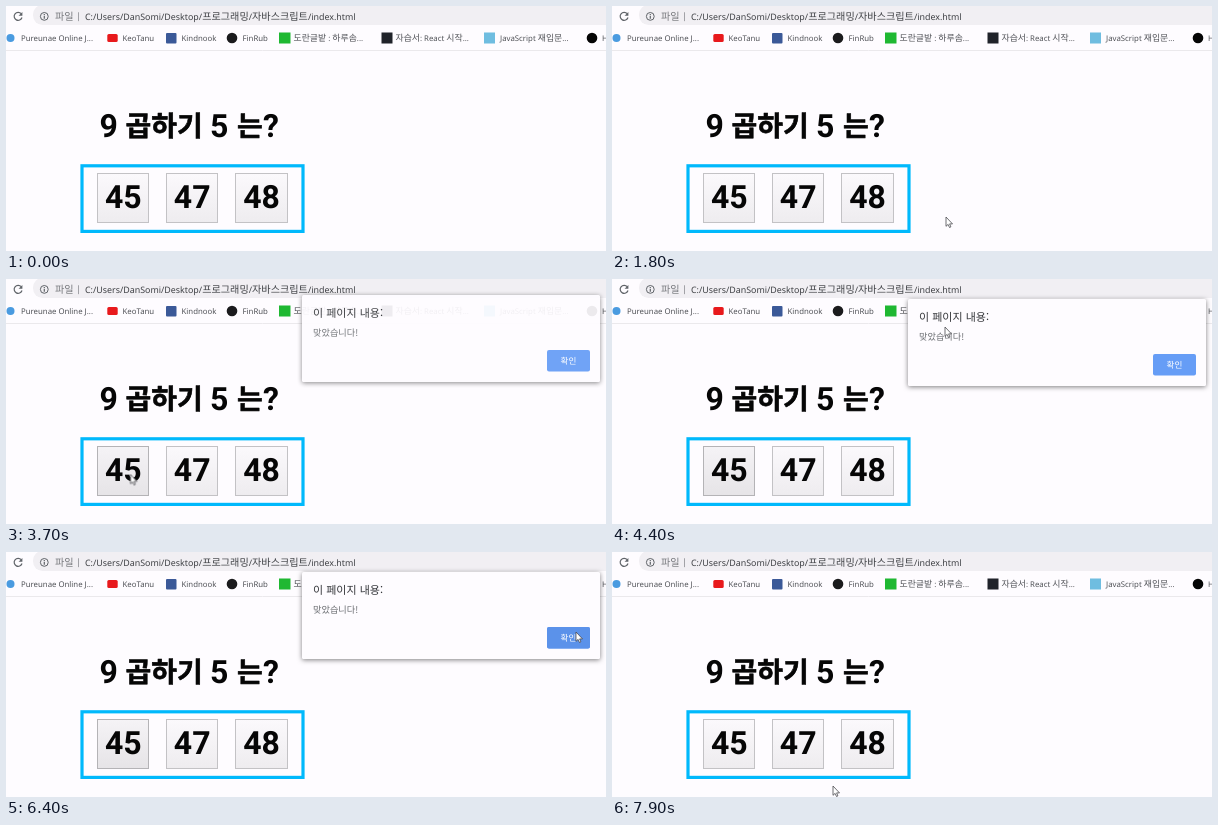
An HTML page that plays this animation: 600x245 px, repeating every 8000 ms.

```html
<!DOCTYPE html>
<html lang="ko">
<head>
<meta charset="utf-8">
<title>Quiz</title>
<style>
html, body { margin: 0; width: 100%; height: 100%; overflow: hidden; background: #fefcff; }
svg { display: block; width: 600px; height: 245px; }
text { font-family: "Noto Sans", "Noto Sans CJK KR", "Noto Sans CJK", sans-serif; white-space: pre; text-rendering: geometricPrecision; }
.ko { font-family: "Noto Sans CJK KR", "Noto Sans CJK", sans-serif; }
.url { font-size: 8.9px; fill: #3f4145; }
.url .ko { font-size: 10.15px; }
.url .soft { fill: #77797d; }
.marks { font-size: 7.8px; fill: #505257; }
.marks .ko { font-size: 8.9px; }
.big { font-weight: 700; fill: #060606; }
.big, .num { font-family: Roboto, "Noto Sans CJK KR", "Noto Sans CJK", sans-serif; font-size: 32px; }
.big .ko { font-size: 28px; stroke: #060606; stroke-width: .6; stroke-linejoin: round; }
.mid { text-anchor: middle; }
.btn { fill: url(#face); stroke: #c3c2c5; }

.hover, .ok-hover, .dialog, .cursor { animation: 8s -20ms infinite step-end; }
.hover { animation-name: hover; }
.ok-hover { animation-name: ok; }
.dialog { animation-name: dialog; filter: drop-shadow(0 1px 2.5px rgba(0, 0, 0, .5)); }
.cursor { animation-name: cursor; animation-timing-function: steps(2); }

@keyframes hover { 0%, 86.25%, 100% { opacity: 0; } 38.75% { opacity: 1; } }
@keyframes ok { 0%, 100% { opacity: 0; } 78.75% { opacity: 1; } }
@keyframes dialog {
  0%, 87.5%, 100% { opacity: 0; transform: translateY(-8px); }
  45% { opacity: .5; transform: translateY(-8px); }
  46.25% { opacity: .93; transform: translateY(-4px); }
  47.5% { opacity: 1; transform: none; }
  85% { opacity: .6; transform: none; }
  86.25% { opacity: .2; transform: none; }
}
/* Circles the quiz, clicks 45, circles the dialog, clicks OK, leaves */
@keyframes cursor {
  0%, 93.75%, 100% { transform: translate(-30px, -30px); animation-timing-function: step-end; }
  5% { transform: translate(240px, 224px); }
  7.5% { transform: translate(345px, 150px); }
  10% { transform: translate(215px, 62px); }
  12.5% { transform: translate(75px, 82px); }
  15% { transform: translate(34px, 150px); }
  17.5% { transform: translate(95px, 226px); }
  20% { transform: translate(235px, 231px); }
  22.5% { transform: translate(334px, 211px); }
  25% { transform: translate(357px, 165px); }
  27.5% { transform: translate(312px, 90px); }
  30% { transform: translate(165px, 68px); animation-timing-function: step-end; }
  31.25% { transform: translate(102px, 87px); }
  33.75% { transform: translate(7px, 165px); }
  36.25% { transform: translate(62px, 236px); animation-timing-function: step-end; }
  37.5% { transform: translate(104px, 221px); }
  40% { transform: translate(118px, 203px); }
  42.5%, 48.75% { transform: translate(124.5px, 195.5px); }
  51.25% { transform: translate(235px, 125px); }
  53.75% { transform: translate(316px, 72px); }
  56.25% { transform: translate(350px, 24px); }
  58.75% { transform: translate(470px, 8px); }
  61.25% { transform: translate(577px, 50px); }
  63.75% { transform: translate(470px, 101px); }
  66.25% { transform: translate(315px, 80px); animation-timing-function: step-end; }
  67.5% { transform: translate(332px, 73px); }
  70% { transform: translate(430px, 112px); }
  72.5% { transform: translate(545px, 119px); }
  75% { transform: translate(593px, 98px); }
  77.5% { transform: translate(576px, 83px); }
  80%, 86.25% { transform: translate(570px, 80px); }
  88.75% { transform: translate(520px, 120px); }
  91.25% { transform: translate(425px, 185px); animation-timing-function: step-end; }
  92.5% { transform: translate(375px, 206px); animation-timing-function: step-end; }
  96.25% { transform: translate(251px, 238px); }
  98.75% { transform: translate(221px, 234px); animation-timing-function: step-end; }
}
</style>
</head>
<body>
<svg viewBox="0 0 600 245">
  <defs>
    <linearGradient id="face" x2="0" y2="1"><stop stop-color="#fbf9fc"/><stop offset="1" stop-color="#eeecef"/></linearGradient>
    <linearGradient id="faceOn" x2="0" y2="1"><stop stop-color="#f5f3f6"/><stop offset="1" stop-color="#e6e4e7"/></linearGradient>
  </defs>
  <rect width="600" height="245" fill="#fefcff"/>

  <!-- address bar -->
  <path d="M0 44.5H600" stroke="#ebe9ec"/>
  <rect x="27" y="-1" width="620" height="20" rx="9.5" fill="#f1eff3"/>
  <g fill="none" stroke="#5f6368" stroke-width="1.2">
    <path d="M15.2 7.7A4 4 0 1 0 16 11.5"/>
    <circle cx="38.3" cy="10.4" r="3.9" stroke-width="1"/>
    <path d="M38.3 9.8V12.7M38.3 7.9V8.9"/>
  </g>
  <path d="M16.4 5.9V9.7H12.6Z" fill="#5f6368"/>
  <g class="url">
    <text x="49" y="13.8" class="soft"><tspan class="ko">파일</tspan></text>
    <text x="70" y="13.2" class="soft">|</text>
    <text x="79" y="13.8">C:/Users/DanSomi/Desktop/<tspan class="ko">프로그래밍</tspan>/<tspan class="ko">자바스크립트</tspan>/index.html</text>
  </g>

  <!-- bookmarks -->
  <circle cx="4.5" cy="32" r="4" fill="#4a9be0"/>
  <rect x="101.3" y="28" width="10.4" height="8" rx="1.5" fill="#e8191c"/>
  <rect x="160" y="27" width="10.5" height="10.5" rx="1" fill="#3b5998"/>
  <circle cx="226" cy="32" r="5.3" fill="#1b1b1d"/>
  <rect x="273" y="26.5" width="11.5" height="11" fill="#1fb832"/>
  <rect x="375.5" y="26.5" width="11" height="11" fill="#20232a"/>
  <rect x="478" y="26.5" width="11" height="11" fill="#6fbde0"/>
  <circle cx="586" cy="32" r="5.3" fill="#050505"/>
  <g class="marks">
    <text x="15" y="35">Pureunae Online J...</text>
    <text x="116.5" y="35">KeoTanu</text>
    <text x="175.5" y="35">Kindnook</text>
    <text x="236.5" y="35">FinRub</text>
    <text x="287.5" y="35"><tspan class="ko">도란글밭</tspan> : <tspan class="ko">하루솜</tspan>...</text>
    <text x="389.5" y="35"><tspan class="ko">자습서</tspan>: React <tspan class="ko">시작</tspan>...</text>
    <text x="494" y="35">JavaScript <tspan class="ko">재입문</tspan>...</text>
    <text x="596" y="35">H</text>
  </g>

  <!-- quiz -->
  <text class="big" y="131"><tspan x="93.5">9</tspan><tspan class="ko" x="119.5" y="130">곱하기</tspan><tspan x="204" y="131">5</tspan><tspan class="ko" x="231" y="130">는</tspan><tspan x="257" y="131">?</tspan></text>
  <rect x="76" y="159.8" width="221" height="65.6" fill="none" stroke="#00b9fc" stroke-width="3.2"/>
  <rect class="btn" x="91.5" y="167.5" width="51" height="49"/>
  <rect class="btn" x="160.5" y="167.5" width="51" height="49"/>
  <rect class="btn" x="229.5" y="167.5" width="52" height="49"/>
  <rect class="hover" x="91.5" y="167.5" width="51" height="49" fill="url(#faceOn)" stroke="#b4b3b6"/>
  <g class="big mid">
    <text class="num" x="117.3" y="202.3">45</text>
    <text class="num" x="186.2" y="202.3">47</text>
    <text class="num" x="255.5" y="202.3">48</text>
  </g>

  <!-- alert -->
  <g class="dialog">
    <rect x="296" y="20" width="298" height="87" rx="1.5" fill="#fefcff"/>
    <text class="ko" x="307" y="42" font-size="11" fill="#333539">이 페이지 내용:</text>
    <text class="ko" x="307" y="61.3" font-size="9.2" fill="#6a6d71">맞았습니다!</text>
    <rect x="541" y="75" width="43" height="21.5" rx="2" fill="#669df6"/>
    <rect class="ok-hover" x="541" y="75" width="43" height="21.5" rx="2" fill="#5b92ea"/>
    <text class="ko mid" x="562.5" y="88.8" font-size="8.6" font-weight="500" fill="#fff">확인</text>
  </g>

  <g class="cursor">
    <path d="M0 0V9.3L2.1 7.4L3.5 10.5L4.9 9.9L3.6 6.9H6.5Z" fill="#fff" stroke="#4a4a4e" stroke-width=".8" stroke-linejoin="round"/>
  </g>
</svg>
</body>
</html>
```
